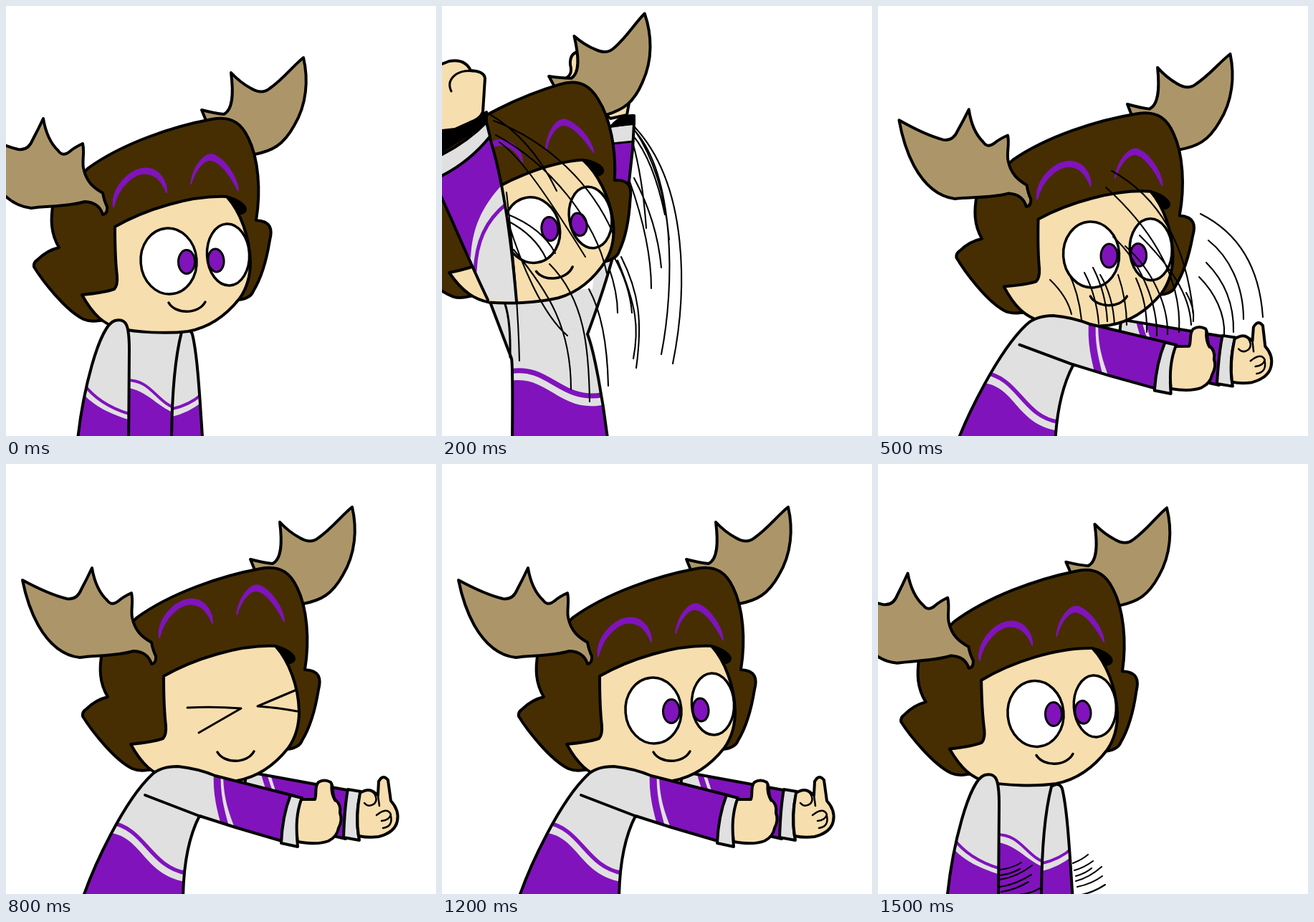
Recreate the animation shown at these times as an HTML page with a canvas. Size 600 by 600 pixels, loop 1600 ms.

```html
<!DOCTYPE html>
<html>
<head>
<meta charset="utf-8">
<style>
html, body { margin: 0; width: 100%; height: 100%; overflow: hidden; background: #fff; }
canvas { display: block; width: 100vmin; height: 100vmin; }
</style>
</head>
<body>
<canvas id="stage" width="600" height="600"></canvas>
<script>
const g = document.getElementById('stage').getContext('2d');
const HAIR = '#462e02', SKIN = '#f7deae', HORN = '#ac9669', PURPLE = '#8013bc', CLOTH = '#e0e0e0';
g.lineCap = g.lineJoin = 'round';

function line(d, width = 4, color = '#000') {
  g.lineWidth = width;
  g.strokeStyle = color;
  g.stroke(new Path2D(d));
}

function fill(d, color) {
  g.fillStyle = color;
  g.fill(new Path2D(d));
}

// Outlined shape; trims are purple areas, or purple lines when a width is given
function part(d, color, trims = [], width = 4) {
  fill(d, color);
  g.save();
  g.clip(new Path2D(d));
  for (const [t, w] of trims) w ? line(t, w, PURPLE) : fill(t, PURPLE);
  g.restore();
  line(d, width);
}

function oval(x, y, rx, ry, color, width, tilt = 0) {
  g.beginPath();
  g.ellipse(x, y, rx, ry, tilt, 0, 7);
  g.fillStyle = color;
  g.fill();
  g.lineWidth = width;
  g.strokeStyle = '#000';
  g.stroke();
}

function brow(d) {
  fill(d, PURPLE);
  line(d, 2, PURPLE);
}

function drawHead([x, y, angle], blink) {
  g.save();
  g.translate(x, y);
  g.rotate(angle * Math.PI / 180);
  g.translate(-320, -346);
  part('M348,150 L341,133 Q360,138 372,139 C386,132 385,105 382,81 Q395,95 410,103 Q425,112 436,103 C455,90 468,72 483,60 C490,90 488,125 470,155 C455,182 440,190 415,195 Z', HORN);
  part('M183,214 C230,180 300,156 355,146 C385,140 398,155 406,172 C420,200 424,245 417,287 C438,288 440,300 436,315 C432,340 424,368 413,386 C410,394 400,398 390,398 L300,420 L198,427 Q185,429 176,425 C150,412 118,370 107,352 Q106,346 112,342 Q125,329 142,325 C130,305 130,285 134,262 Z', HAIR);
  part('M220,296 C262,272 325,252 376,254 C395,275 408,310 409,345 C409,365 404,382 394,396 C375,420 350,437 322,442 C290,446 250,443 225,438 C205,432 190,420 174,391 Q205,388 219,383 Q224,378 223,365 C220,340 220,320 220,296 Z', SKIN);
  fill('M374,252 C395,256 408,268 403,275 Q398,281 391,278 Q384,262 374,252 Z', '#000');

  g.save();
  if (blink) g.translate(-4, -26);
  brow('M218,268 C214,240 246,210 268,215 C283,218 292,233 292,248 C288,238 280,224 266,222 C248,218 224,240 218,268 Z');
  brow('M326,236 C330,210 346,192 358,196 C374,203 390,226 392,245 C382,226 368,206 355,203 C344,201 332,216 326,236 Z');
  g.restore();

  if (blink) {
    line('M253,340 Q290,338 328,341 L269,375', 3);
    line('M403,316 L351,338 Q380,340 406,345', 3);
  } else {
    oval(295, 344, 39, 46, '#fff', 3.5, -.08);
    oval(378, 335, 29.5, 43, '#fff', 3.5, -.05);
    oval(320, 345, 11.5, 16.5, PURPLE, 3);
    oval(361, 343, 11, 16, PURPLE, 3, -.1);
  }
  line('M295,402 C304,418 336,419 346,401', 3.5);
  part('M23,162 Q60,182 85,188 Q99,190 105,175 Q113,160 120,145 Q125,175 141,190 Q147,199 157,191 Q164,185 175,180 C178,192 174,203 176,214 C180,234 191,242 203,249 Q205,260 209,268 Q210,278 203,279 Q198,262 178,261 C155,268 125,267 103,270 C75,267 57,246 45,225 C34,205 28,187 23,162 Z', HORN);
  g.restore();
}

const rest = {
  back() {
    part('M165,440 L250,445 L240,620 L165,620 Z', CLOTH, [
      ['M160,532 C200,533 208,562 245,571 L245,620 L160,620 Z'],
      ['M168,522 C205,522 208,554 242,563', 4]]);
    part('M231,615 C231,540 236,490 245,455 Q256,448 260,458 C268,490 271,560 275,615 Z', CLOTH, [
      ['M228,574 Q255,568 274,552 L280,620 L220,620 Z'],
      ['M228,563 Q255,558 274,541', 4]]);
  },
  front() {
    part('M99,615 C106,540 130,445 152,439 C168,435 172,445 172,480 L171,615 Z', CLOTH, [
      ['M105,538 C125,562 150,570 176,579 L176,620 L90,620 Z'],
      ['M108,527 C125,550 150,563 175,570', 4]]);
  }
};

const up = {
  back() {
    part('M165,103 Q184,100 179,82 Q178,66 190,64 L262,130 L258,152 L235,157 Z', SKIN);
    fill('M60,395 L225,395 L203,458 L97,492 Z', CLOTH);
    part('M203,458 C245,345 250,300 261,245 L266,200 L268,163 L235,168', CLOTH, [
      ['M225,192 L275,188 L270,300 L225,300 Z']]);
    line('M238,192 L267,189', 3);
    part('M237,167 Q250,152 268,153 L268,164 Z', '#000');
    part('M64,405 L97,492 Q99,500 98,612 L232,612 C225,550 212,480 203,458', CLOTH, [
      ['M95,523 C148,514 165,570 228,556 L235,620 L90,620 Z'],
      ['M95,510 C148,500 165,552 222,543', 7]]);
  },
  front() {
    part('M104,412 C97,330 85,240 66,182 L-12,243 C0,265 35,350 64,410', CLOTH, [
      ['M60,170 L86,247 C55,280 42,310 40,352 L-20,250 Z'],
      ['M90,276 C60,300 48,330 46,370', 5]]);
    part('M-28,186 Q30,172 62,148 L62,163 L-20,215 Z', '#000');
    part('M-22,218 Q30,195 62,162 L67,182 Q35,222 -13,243 Z', CLOTH);
    part('M-18,88 L10,77 Q32,73 40,90 Q59,91 60,101 L57,148 Q53,158 38,163 L18,172 L-18,176 Z', SKIN);
    line('M13,119 Q6,105 20,95 Q30,89 44,91', 3);
    line('M88,416 Q96,440 95,490', 3);
  }
};

const reach = {
  back() {
    part('M335,428 L345,431 L482,456 L474,523 L330,490 Z', CLOTH, [
      ['M368,430 Q374,450 384,480 L390,530 L490,530 L500,450 Z'],
      ['M359,428 Q364,450 374,470', 8]]);
    part('M477,454 L495,457 C489,480 489,505 493,525 L471,521 C472,495 473,475 477,454 Z', CLOTH);
    part('M494,459 Q505,452 512,457 L519,462 L520,443 Q526,432 533,441 L537,470 Q549,483 546,498 Q543,514 520,520 Q505,522 492,519 C489,500 490,480 494,459 Z', SKIN);
    line('M512,457 Q520,468 514,474 Q506,480 500,473 M519,462 L521,477 M517,490 Q532,478 537,489 Q535,497 524,498 M537,491 Q540,506 526,508', 2.5);
  },
  front() {
    part('M105,612 C122,560 165,470 203,434 Q215,422 240,422 Q268,425 292,435 L402,463 L388,527 L320,507 L270,491 C255,520 247,560 247,612 Z', CLOTH, [
      ['M140,514 C190,517 190,572 250,583 L250,620 L90,620 Z'],
      ['M145,500 C195,508 200,562 252,571', 5.5],
      ['M303,430 C303,465 310,485 322,515 L400,540 L420,455 Z'],
      ['M295,430 C293,460 300,485 307,510', 10]]);
    line('M194,462 L272,492');
    part('M397,462 L413,466 C406,490 404,510 407,534 L384,529 C385,505 388,485 397,462 Z', CLOTH);
    part('M412,468 L431,468 C434,460 430,450 436,444 Q444,439 453,444 C458,450 454,460 459,468 Q468,475 466,487 Q470,497 464,508 Q462,520 450,526 Q435,532 407,527 C404,505 406,485 412,468 Z', SKIN);
    line('M454,447 Q453,460 459,470', 3);
  }
};

const lower = {
  back() {
    part('M395,560 L434,602 L400,620 L380,590 Z', SKIN);
    part('M270,440 L296,459 L382,541 L398,562 L395,590 L300,520 Z', CLOTH, [
      ['M330,510 L340,498 L382,541 Q386,555 378,570 L325,530 Z'],
      ['M322,508 L333,490', 5]]);
    line('M382,541 Q386,555 378,570', 3);
  },
  front() {
    part('M102,612 C115,560 160,480 205,435 Q222,420 242,434 L403,588 L400,612 L301,612 L266,541 C250,560 246,585 247,612 Z', CLOTH, [
      ['M140,514 C185,518 182,574 248,586 L247,620 L90,620 Z'],
      ['M145,502 C195,510 185,558 252,570', 5.5],
      ['M272,560 Q315,543 336,506 L388,574 Q372,590 352,601 L340,620 L290,620 Z'],
      ['M266,549 Q312,532 330,492', 6]]);
    line('M228,473 Q240,500 268,545');
    line('M388,574 Q372,590 352,601', 3);
  }
};

const trails = {
  lift: 'M268,168 C345,250 342,400 322,499 M270,175 C325,240 325,390 306,486 M268,172 Q308,230 317,326 M266,180 Q295,215 311,291 M268,240 Q300,300 306,365 M262,245 Q292,330 292,394 M266,190 Q280,240 285,310 M250,350 C275,400 280,440 271,505 M245,355 C272,420 275,450 267,492 M240,350 Q262,390 265,428 M233,365 Q245,400 245,428 M205,395 Q230,440 232,530',
  liftNear: 'M65,150 Q125,185 160,258 M72,160 C150,190 210,250 239,318 M75,180 C150,220 215,300 230,373 M90,290 Q140,310 158,345 M92,300 Q130,320 145,352 M80,190 C110,210 150,270 200,350 M92,300 C110,360 140,430 175,460 M100,340 C150,400 180,450 180,535 M150,360 C200,410 205,480 206,552 M90,260 Q106,400 108,495',
  slam: 'M450,290 C500,315 532,360 537,434 M461,327 C490,350 510,390 510,437 M458,358 C480,380 497,410 496,455 M448,378 C470,400 485,430 483,460 M326,230 C390,265 430,330 440,430 M318,253 C370,300 425,370 420,455 M365,320 C405,360 435,400 437,445 M328,322 C370,360 390,420 389,460 M345,335 C385,370 405,420 404,458',
  slamNear: 'M265,370 Q280,400 284,438 M288,372 Q305,405 308,443 M310,375 Q328,405 330,445 M240,382 Q264,405 270,430 M300,365 Q318,400 320,440 M335,375 Q347,410 347,445 M360,380 Q376,415 375,455 M430,400 Q442,420 440,440',
  drop: 'M465,527 Q463,560 428,588 M442,532 Q440,560 413,579 M438,522 Q428,545 405,565 M424,520 Q420,540 398,556 M410,520 Q405,535 388,548 M396,513 Q390,528 374,538 M382,506 Q376,518 362,526 M366,503 Q360,512 352,515 M430,540 Q420,560 405,570 M408,536 Q402,545 392,552',
  settle: 'M293,545 Q285,552 272,557 M300,554 Q288,563 274,567 M298,564 Q290,571 276,575 M312,562 Q295,577 276,582 M313,575 Q298,586 278,590 M317,587 Q300,598 284,601 M200,556 Q188,564 170,566 M198,565 Q186,572 170,574 M215,560 Q195,576 170,580 M214,573 Q192,587 170,590 M210,583 Q192,594 172,597 M226,592 Q212,600 196,601'
};

const still = [1, 0, 0, 1, 0, 0];
const shift = (x, y) => [1, 0, 0, 1, x, y];
const lean = [1, -.017, -.025, 1, 15, 14];

// One step per 100 ms: arms, their transform, head place and tilt, extras
const ahead = { arms: reach, move: still, head: [320, 346, 0] };
const blink = { ...ahead, blink: true };
const steps = [
  { arms: rest, move: still, head: [252, 358, 0] },
  { arms: rest, move: shift(1, 6), head: [254, 366, .5] },
  { arms: up, move: still, head: [150.5, 312, -6], trail: ['lift', 'liftNear'] },
  { arms: up, move: shift(4, 6), head: [156, 319, -5] },
  { arms: up, move: shift(1, 3), head: [152, 315, -6] },
  { arms: reach, move: lean, head: [322.5, 349.5, 1.2], trail: ['slam', 'slamNear'] },
  ahead, ahead, blink, ahead, ahead, blink, ahead, ahead,
  { arms: lower, move: still, head: [315, 359, 3.5], trail: ['drop'] },
  { arms: rest, move: shift(-3, -5), head: [245, 350, -1], trail: ['settle'] }
];

function body(draw, move) {
  g.save();
  g.transform(...move);
  draw();
  g.restore();
}

function frame() {
  const step = steps[Math.floor(performance.now() / 100) % steps.length];
  g.fillStyle = '#fff';
  g.fillRect(0, 0, 600, 600);
  body(step.arms.back, step.move);
  drawHead(step.head, step.blink);
  body(step.arms.front, step.move);
  for (const name of step.trail || []) line(trails[name], 2.1);
  requestAnimationFrame(frame);
}
frame();
</script>
</body>
</html>
```
